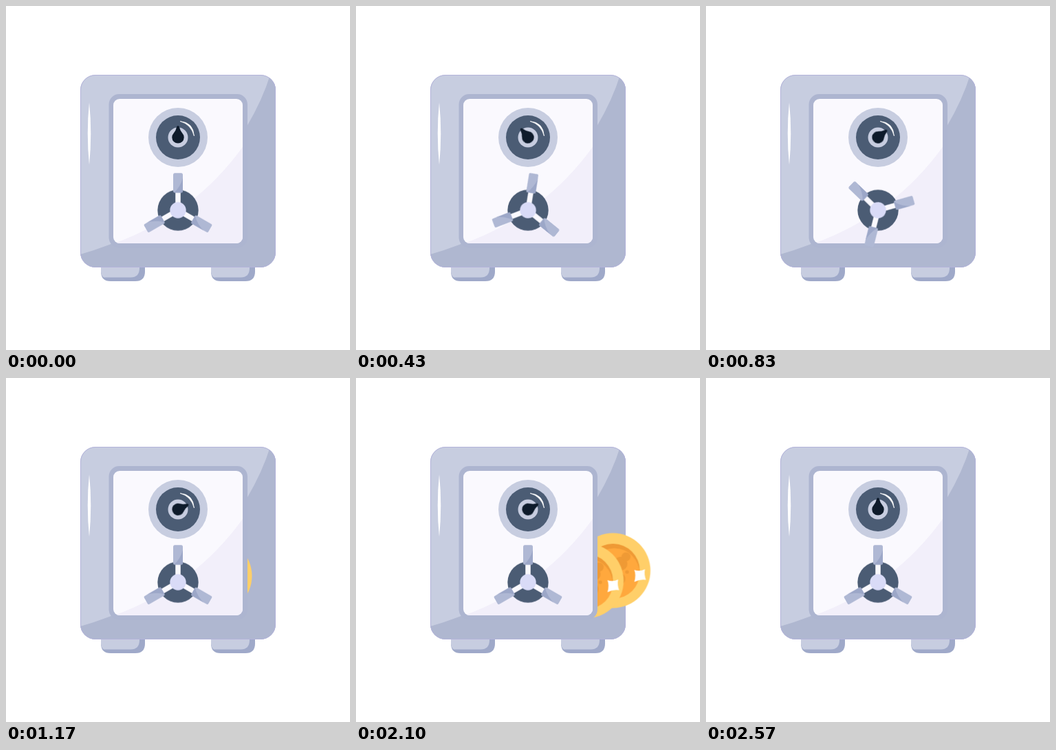
Write an HTML page that moves like this. It is 500 px wide and 500 px high and loops after 3210 ms.

```html
<!DOCTYPE html>
<html lang="en">
<head>
<meta charset="utf-8">
<title>Safe with coins</title>
<style>
  html, body { margin: 0; width: 100%; height: 100%; overflow: hidden; background: #fff; }
  svg { display: block; width: 100%; height: 100%; }

  .needle, .wheel, .coin { animation: 3210ms linear infinite; }
  .needle { animation-name: needle; }
  .wheel { animation-name: wheel; }
  .back { animation-name: back; }
  .front { animation-name: front; }

  @keyframes needle {
    0%, 4.74% { transform: rotate(0deg); }
    12.77% { transform: rotate(-45deg); }
    20.87% { transform: rotate(28deg); }
    28.97%, 64.9% { transform: rotate(65deg); }
    79.75%, 100% { transform: rotate(0deg); }
  }
  @keyframes wheel {
    0%, 4.74% { transform: rotate(0deg); }
    28.97%, 100% { transform: rotate(360deg); }
  }
  @keyframes back {
    0%, 35.3%, 79.75%, 100% { transform: translate(294.5px, 288.5px); }
    46.73%, 64.9% { transform: translate(376.5px, 279.5px); }
  }
  @keyframes front {
    0%, 35.3%, 79.75%, 100% { transform: translate(294.5px, 288.5px); }
    46.73%, 64.9% { transform: translate(336px, 295px); }
  }
</style>
</head>
<body>
<svg viewBox="0 0 500 500" xmlns="http://www.w3.org/2000/svg">
  <defs>
    <clipPath id="bodyClip"><rect x="108" y="100" width="284" height="280" rx="22"/></clipPath>
    <clipPath id="panelClip"><rect x="156" y="135" width="188" height="210" rx="9"/></clipPath>
    <clipPath id="gripClip"><rect x="-7" y="-54" width="14" height="28.5" rx="2.5"/></clipPath>

    <g id="foot">
      <path d="M0 378H64V386Q64 400 50 400H14Q0 400 0 386Z" fill="#9fa9c9"/>
      <path d="M0 378H56V381Q56 394.5 43 394.5H4Q0 391 0 386Z" fill="#c7cde0"/>
    </g>

    <g id="arm">
      <path d="M0 0V-28" stroke="#faf9fe" stroke-width="7.5"/>
      <g clip-path="url(#gripClip)">
        <rect x="-7" y="-54" width="14" height="29" fill="#afb8d4"/>
        <path d="M8 -51Q5 -35 -6 -25H8Z" fill="#9ca7c8"/>
      </g>
    </g>

    <g id="coin">
      <circle r="54.5" fill="#ffcf69"/>
      <circle r="39" fill="#ef9a35"/>
      <circle cx="2" cy="4" r="36.5" fill="#ffa83d"/>
      <g fill="#ef9a35">
        <circle cx="11" cy="-10" r="10"/>
        <circle cx="19" cy="-20" r="6.5"/>
        <circle cx="17" cy="-8" r="3.2"/>
        <circle cx="20.5" cy="2" r="2.6"/>
        <circle cx="10" cy="12" r="8"/>
      </g>
      <path transform="translate(39 7)" fill="#fff"
        d="M-8 -8Q0 -5 7.5 -9Q6 -1 9 6.5Q1 5 -8 9.5Q-5 0 -8 -8Z"/>
    </g>
  </defs>

  <use href="#foot" x="138"/>
  <use href="#foot" x="298"/>

  <g clip-path="url(#bodyClip)">
    <rect x="108" y="100" width="284" height="280" fill="#c7cde0"/>
    <path d="M384 100Q373 136 350 175Q278 312 108 361V380H392V100Z" fill="#afb7d0"/>
  </g>
  <rect x="108.5" y="100.5" width="283" height="279" rx="21.5" fill="none" stroke="#b3b3da"/>
  <path d="M121 140Q116.5 185 121 231Q125.5 185 121 140Z" fill="#fff"/>

  <g class="coin back"><use href="#coin"/></g>
  <g class="coin front"><use href="#coin"/></g>

  <rect x="149.5" y="128" width="201.5" height="223.5" rx="15" fill="#adb5d0"/>
  <g clip-path="url(#panelClip)">
    <rect x="156" y="135" width="188" height="210" fill="#faf9fe"/>
    <path d="M346 202Q274 304 152 347H346Z" fill="#f2effa"/>
  </g>

  <g transform="translate(250 191)">
    <circle r="43" fill="#c7cde0"/>
    <circle r="32" fill="#4b5c74"/>
    <path d="M3 -23.5Q22 -22 23.5 -2Q19 -19 3 -23.5Z" fill="#fff" stroke="#fff" stroke-width=".7" stroke-linejoin="round"/>
    <circle r="14.5" fill="#c7cde0"/>
    <path class="needle" fill="#0e1b2b"
      d="M-1.8 -15.5Q0 -18.5 1.8 -15.5Q3 -10 6.4 -6A8.7 8.7 0 1 1 -6.4 -6Q-3 -10 -1.8 -15.5Z"/>
  </g>

  <g transform="translate(250 296.8)">
    <circle r="29.7" fill="#4b5c74"/>
    <g class="wheel">
      <use href="#arm"/>
      <use href="#arm" transform="rotate(120)"/>
      <use href="#arm" transform="rotate(240)"/>
      <circle r="11.7" fill="#d9dbf7"/>
    </g>
  </g>
</svg>
</body>
</html>
```
